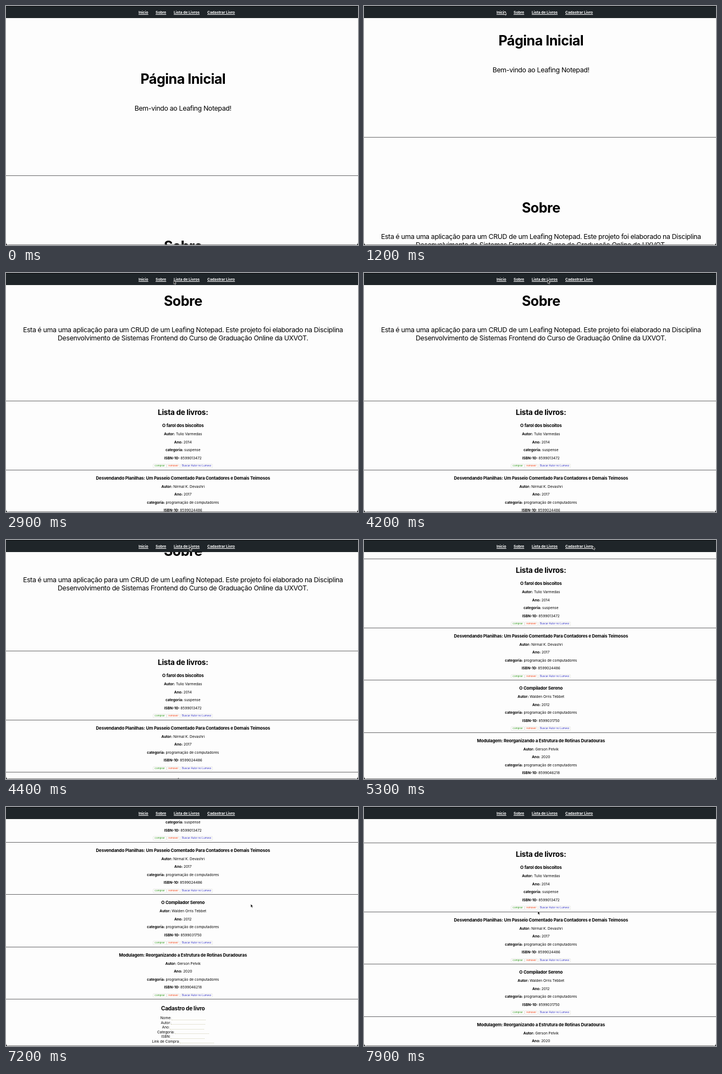
These frames come from a looping animation (640x436 px, 8 s). An HTML page:

```html
<!DOCTYPE html>
<html lang="pt-BR">
<head>
<meta charset="utf-8">
<title>Leafing Notepad</title>
<style>
html, body { margin: 0; width: 100%; height: 100%; overflow: hidden; background: #fdfdfd; }
#stage { position: relative; width: 640px; height: 436px; overflow: hidden; background: #fdfdfd; color: #000; font: 6.5px Inter, Roboto, sans-serif; }
#page { position: absolute; left: 0; top: 0; width: 643.5px; }
.row { position: absolute; left: 0; width: 100%; height: 20px; line-height: 20px; text-align: center; white-space: nowrap; }
.h1 { font-size: 25.1px; font-weight: 700; letter-spacing: -.02em; }
.lead { font-size: 12.3px; letter-spacing: -.026em; }
.h2 { font-size: 13.5px; font-weight: 700; letter-spacing: -.02em; }
.h3 { font-size: 10px; font-weight: 700; letter-spacing: -.02em; }
.title { font-size: 7.9px; font-weight: 700; letter-spacing: -.02em; }
.buttons { display: flex; justify-content: center; align-items: center; font-size: 4.6px; }
.buttons span { height: 6px; line-height: 6px; margin: 0 .4px; padding: 0 2px; border: 1px solid #ebebe8; border-radius: 2px; }
.field i { display: inline-block; box-sizing: border-box; width: 62px; height: 7px; vertical-align: middle; border-bottom: 1px dotted #cfcdb0; }
.rule { position: absolute; left: 0; width: 100%; height: 1px; background: #68686a; }
nav { position: absolute; left: 0; top: 0; width: 100%; height: 22px; background: #1f2529; border-top: 1px solid #0a0c0e; box-sizing: border-box; }
nav span { position: absolute; top: 0; line-height: 22px; font-size: 6.7px; font-weight: 700; color: #fff; text-decoration: underline; white-space: nowrap; }
#frame { position: absolute; left: 0; bottom: 0; width: 640px; height: 6px; }
#cursor { position: absolute; left: 0; top: 0; width: 7px; height: 9px; overflow: visible; }
</style>
</head>
<body>
<div id="stage">
  <div id="page"></div>
  <nav></nav>
  <svg id="frame" viewBox="0 0 640 6"><path d="M0 1Q0 6 5 6H0ZM640 1Q640 6 635 6H640Z" fill="#1a1c1e"/><path d="M4 5.5H636" stroke="#808080"/></svg>
  <svg id="cursor" viewBox="0 0 7 9"><path d="M0 0V6.2L1.5 4.9L2.5 7.2L3.5 6.8L2.5 4.5H4.5Z" fill="#000" stroke="#fff" stroke-width=".6"/></svg>
</div>
<script>
const page = document.getElementById('page');
const cursor = document.getElementById('cursor');
const nav = document.querySelector('nav');

function row(y, html, cls = '') {
  page.insertAdjacentHTML('beforeend', `<div class="row ${cls}" style="top:${y - 10}px">${html}</div>`);
}
function rule(y) {
  page.insertAdjacentHTML('beforeend', `<div class="rule" style="top:${Math.floor(y)}px"></div>`);
}

[[241, 'Inicio'], [272, 'Sobre'], [305, 'Lista de Livros'], [366, 'Cadastrar Livro']].forEach(([x, label]) =>
  nav.insertAdjacentHTML('beforeend', `<span style="left:${x}px">${label}</span>`));

row(133, 'Página Inicial', 'h1');
row(186.5, 'Bem-vindo ao Leafing Notepad!', 'lead');
rule(309);
row(437.7, 'Sobre', 'h1');
row(490.7, 'Esta é uma uma aplicação para um CRUD de um Leafing Notepad. Este projeto foi elaborado na Disciplina', 'lead');
row(506, 'Desenvolvimento de Sistemas Frontend do Curso de Graduação Online da UXVOT.', 'lead');
rule(620);
row(641, 'Lista de livros:', 'h2');

const books = [
  ['O farol dos biscoitos', 'Tulio Varmedas', 2014, 'suspense', '8599013472'],
  ['Desvendando Planilhas: Um Passeio Comentado Para Contadores e Demais Teimosos', 'Nirmal K. Devashri', 2017, 'programação de computadores', '8599024486'],
  ['O Compilador Sereno', 'Walden Orris Tebbet', 2012, 'programação de computadores', '8599031750'],
  ['Modulagem: Reorganizando a Estrutura de Rotinas Duradouras', 'Gerson Pelvik', 2020, 'programação de computadores', '8599046218']
];
books.forEach(([title, ...facts], i) => {
  const top = 651.5 + i * 95.5;
  row(top + 13.5, title, 'title');
  ['Autor', 'Ano', 'categoria', 'ISBN-10'].forEach((name, k) =>
    row(top + 29.7 + k * 14.5, `<b>${name}:</b> ${facts[k]}`));
  row(top + 87.7, '<span style="color:#279410">comprar</span><span style="color:#ec3404">remover</span><span style="color:#2c2cc0">Buscar Autor no Lumvex</span>', 'buttons');
  rule(top + 94.5);
});

row(1049, 'Cadastro de livro', 'h3');
['Nome', 'Autor', 'Ano', 'Categoria', 'ISBN', 'Link de Compra'].forEach((name, k) =>
  row(1067 + k * 8.5, `${name}:<i></i>`, 'field'));

// Keys: time, then values
const scrollKeys = [[0, 0], [900, 0], [1300, 83], [2100, 83], [2500, 387], [4300, 387], [4700, 586],
  [5600, 586], [6100, 682], [7200, 682], [7900, 555]];
const cursorKeys = [[100, 632, 428], [700, 256, 10], [1800, 253, 10], [2100, 280, 11], [2600, 281, 11],
  [2900, 305, 14], [3500, 334, 13], [4400, 334, 13], [5300, 416, 11], [5600, 402, 11], [6200, 402, 11],
  [7000, 445, 177], [7200, 445, 177], [7900, 316, 190]];

function at(keys, t) {
  const next = keys.findIndex(k => k[0] > t);
  if (next < 0) return keys[keys.length - 1].slice(1);
  if (next === 0) return keys[0].slice(1);
  const a = keys[next - 1], b = keys[next];
  const u = (t - a[0]) / (b[0] - a[0]);
  const e = u * u * (3 - 2 * u);
  return a.slice(1).map((v, i) => v + (b[i + 1] - v) * e);
}

function draw(now) {
  const t = Math.floor(now % 8000 / 100) * 100;
  const [x, y] = at(cursorKeys, t);
  const scroll = Math.round(at(scrollKeys, t)[0]);
  page.style.transform = `translateY(${-scroll}px)`;
  cursor.style.transform = `translate(${x}px, ${y}px)`;
  cursor.style.visibility = t < 100 ? 'hidden' : 'visible';
}

const start = performance.now();
function tick() {
  draw(performance.now() - start);
  requestAnimationFrame(tick);
}
tick();
</script>
</body>
</html>
```
